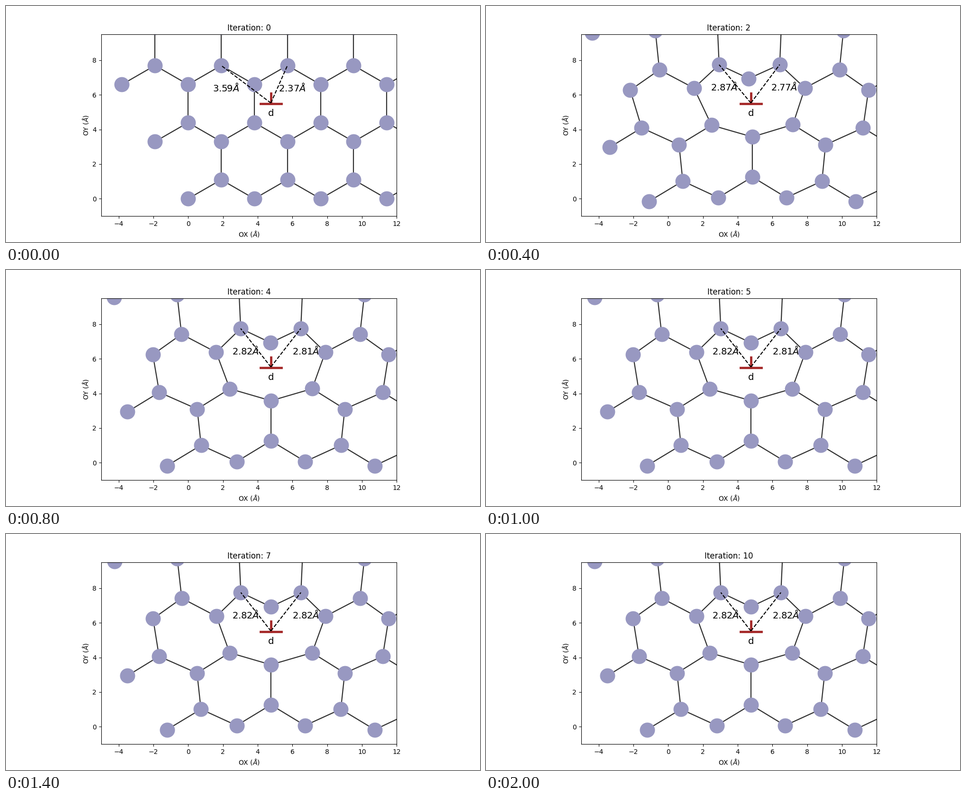
Recreate the animation shown at these times as a matplotlib script. Size 1000 by 500 pixels, loop 2.2 s.

```python
import numpy as np
import matplotlib.pyplot as plt
from matplotlib.animation import FuncAnimation
from matplotlib.collections import LineCollection

FRAMES, INTERVAL = 11, 200
A = 3.81                      # lattice constant, also the Burgers vector
BOND = A / np.sqrt(3)
CUTOFF = 2.7                  # longest distance drawn as a bond
NU = 0.34                     # Poisson ratio
DAMPING = 0.7
CORE = np.array([1.25 * A, 5.531])
BAR_Y = 5.5
ATOM_COLOR, BOND_COLOR = "#9898c1", "#303030"


def honeycomb(columns=7, rows=4):
    cells = [(i * A - j * A / 2, 1.5 * j * BOND)
             for j in range(rows) for i in range(columns)]
    return np.array([(x + s * A / 2, y + s * BOND / 2)
                     for x, y in cells for s in (0, 1)])


def field(p):
    """Displacement of an edge dislocation at points relative to its core."""
    x, y = p[:, 0], p[:, 1]
    r2 = x**2 + y**2
    k = 1 / (4 * (1 - NU))
    u = np.arctan2(y, x) + 2 * k * x * y / r2
    v = 0.25 - k * ((1 - 2 * NU) * np.log(r2) + (x**2 - y**2) / r2)
    return A / (2 * np.pi) * np.column_stack([u, v])


def jacobian(p, h=1e-5):
    steps = h * np.eye(2)
    return np.stack([(field(p + s) - field(p - s)) / (2 * h) for s in steps],
                    axis=2)


def relax(atoms, count):
    """Damped Newton steps towards u = field(atoms + u)."""
    start = atoms - CORE
    u = np.zeros_like(start)
    states = [atoms]
    for _ in range(count - 1):
        p = start + u
        step = np.linalg.solve(np.eye(2) - jacobian(p),
                               (field(p) - u)[:, :, None])
        u = u + DAMPING * step[:, :, 0]
        states.append(atoms + u)
    return states


def find_bonds(atoms):
    gaps = np.linalg.norm(atoms[:, None] - atoms[None], axis=2)
    i, j = np.where(np.triu(gaps < CUTOFF, 1))
    return np.stack([atoms[i], atoms[j]], axis=1)


lattice = honeycomb()
states = relax(lattice, FRAMES)
tracked = [np.argmin(np.hypot(*(lattice - (x, 3.5 * BOND)).T))
           for x in (A / 2, 1.5 * A)]

fig, ax = plt.subplots(figsize=(10, 5), dpi=100)
ax.set_aspect("equal")
ax.set_xlim(-5, 12)
ax.set_ylim(-1, 9.5)
ax.set_xlabel("OX ($Å$)")
ax.set_ylabel("OY ($Å$)")
title = ax.set_title("")

bonds = LineCollection([], colors=BOND_COLOR, linewidths=1.6, zorder=1)
ax.add_collection(bonds, autolim=False)
dots, = ax.plot([], [], "o", color=ATOM_COLOR, markersize=22, zorder=2)

cx = CORE[0]
bar = dict(color="brown", lw=3.5, zorder=3)
ax.plot([cx - 0.6, cx + 0.6], [BAR_Y, BAR_Y], **bar)
ax.plot([cx, cx], [BAR_Y, BAR_Y + 0.6], **bar)
ax.text(cx, 4.77, "d", fontsize=14, ha="center", zorder=5)

rays = [ax.plot([], [], "k--", lw=1.5, zorder=4)[0] for _ in tracked]
labels = [ax.text(0, 0, "", fontsize=14, zorder=5) for _ in tracked]


def draw(n):
    atoms = states[n]
    title.set_text(f"Iteration: {n}")
    bonds.set_segments(find_bonds(atoms))
    dots.set_data(atoms[:, 0], atoms[:, 1])
    for index, ray, label in zip(tracked, rays, labels):
        x, y = atoms[index]
        ray.set_data([cx, x], [CORE[1], y])
        label.set_position((x - 0.5, y - 1.5))
        label.set_text(f"{np.hypot(x - cx, y - CORE[1]):.2f}$Å$")
    return [title, bonds, dots, *rays, *labels]


anim = FuncAnimation(fig, draw, frames=FRAMES, interval=INTERVAL,
                     init_func=lambda: draw(0), repeat=True, repeat_delay=0)
plt.show()
```
